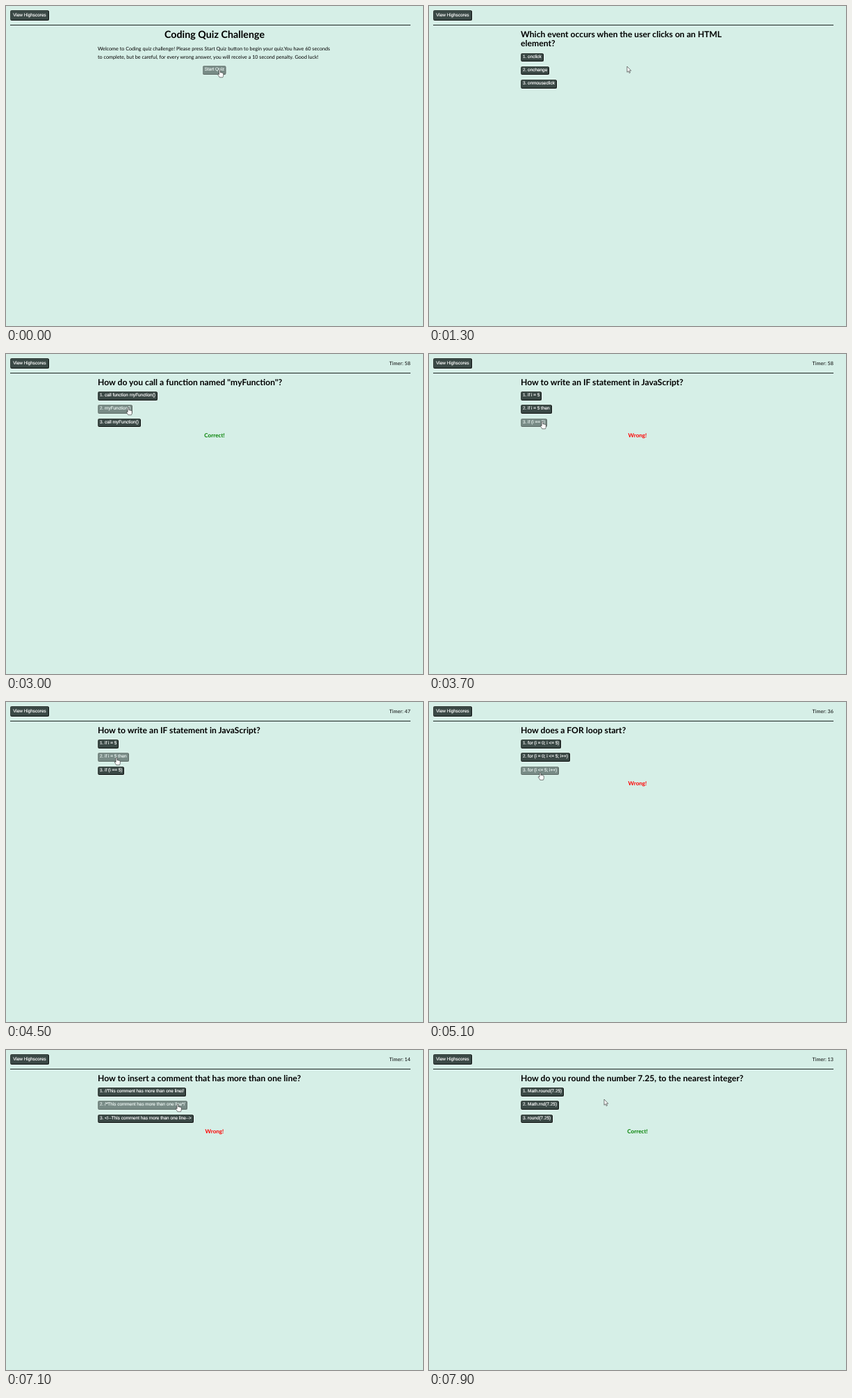
These frames come from a looping animation (600x461 px, 8 s). An HTML page:

```html
<!DOCTYPE html>
<html lang="en">
<head>
<meta charset="utf-8">
<title>Coding Quiz</title>
<style>
  html, body { margin: 0; width: 100%; height: 100%; overflow: hidden; background: #d6efe7; }
  #stage { position: relative; width: 600px; height: 461px; overflow: hidden; color: #000;
    font: 7.23px/11.5px Lato, sans-serif; text-rendering: geometricPrecision; }
  #stage > *, .screen > * { position: absolute; margin: 0; white-space: pre; }
  #stage > .screen { inset: 0; }
  hr { left: 6px; top: 27px; width: 576px; height: 1px; border: 0; background: #1c2523; }
  h1 { left: 0; width: 600px; top: 33px; text-align: center; font: bold 14.3px/18px Lato, sans-serif; }
  h2 { left: 132px; top: 33.9px; font: bold 12.17px/13.5px Lato, sans-serif; }
  p { left: 132px; top: 56px; }
  .button { left: 132px; box-sizing: border-box; height: 12.5px; padding: 0 2px; border-radius: 2.5px;
    border: 1px solid; border-color: #37443f #0c1210 #0c1210 #37443f; background: #3b4946; color: #fff;
    box-shadow: 0 0 0 .7px #e6f7f1; -webkit-text-stroke: .15px #fff;
    font: 6.4px/10.5px "Liberation Sans", Arial, sans-serif; }
  .button.hover { opacity: .6; }
  #scores { left: 6px; top: 6px; height: 15px; padding: 0 3.2px; line-height: 13px; }
  #start { left: 300px; top: 86px; transform: translateX(-50%); }
  #timer { right: 18px; top: 8.4px; }
  #message { left: 0; width: 600px; top: 110.5px; text-align: center; font: bold 8.1px/12px Lato, sans-serif; }
  #pointer { left: 0; top: 0; overflow: visible; fill: #fff; stroke: #222; stroke-width: .6; stroke-linejoin: round; }
</style>
</head>
<body>
<div id="stage">
  <div id="scores" class="button">View Highscores</div>
  <div id="timer"></div>
  <hr>
  <div class="screen">
    <h1>Coding Quiz Challenge</h1>
    <p>Welcome to Coding quiz challenge! Please press Start Quiz button to begin your quiz.You have 60 seconds
to complete, but be careful, for every wrong answer, you will receive a 10 second penalty. Good luck!</p>
    <div id="start" class="button">Start Quiz</div>
  </div>
  <div id="message"></div>
  <svg id="pointer" width="8" height="12">
    <path id="arrow" d="M0 0V8.4L1.9 6.7 3.2 9.6 4.5 9 3.2 6.2H5.8Z"/>
    <path id="hand" d="M-.9 .7Q0-.6 .9 .7V4Q1.8 3.3 2.5 4.2 3.4 3.6 4 4.6 5.2 4.2 5.3 5.6V8Q5.2 9.4 4.4 10.8H-.2Q-1.2 8.8-2.6 7.2-3 5.8-1.8 6L-.9 6.8Z"/>
  </svg>
</div>
<script>
const LOOP = 8000, STEP = 100, FIRST_TICK = 1800, MESSAGE_TIME = 1000, PENALTY = 10;

// Each question opens with the click that answers the previous one.
const questions = [
  { at: 700, title: 'Which event occurs when the user clicks on an HTML\nelement?',
    options: ['onclick', 'onchange', 'onmouseclick'] },
  { at: 2400, verdict: 'Correct!', title: 'How do you call a function named "myFunction"?',
    options: ['call function myFunction()', 'myFunction()', 'call myFunction()'] },
  { at: 3500, verdict: 'Wrong!', title: 'How to write an IF statement in JavaScript?',
    options: ['if i = 5', 'if i = 5 then', 'if (i == 5)'] },
  { at: 4600, verdict: 'Wrong!', title: 'How does a FOR loop start?',
    options: ['for (i = 0; i <= 5)', 'for (i = 0; i <= 5; i++)', 'for (i <= 5; i++)'] },
  { at: 5400, verdict: 'Wrong!', title: 'What is the correct way to write a JavaScript array?',
    options: ['var colors = (1:"red", 2:"green", 3:"blue")', 'var colors = "red", "green", "blue"',
      'var colors = ["red", "green", "blue"]'] },
  { at: 6500, verdict: 'Wrong!', title: 'How to insert a comment that has more than one line?',
    options: ['//This comment has more than one line//', '/*This comment has more than one line*/',
      '<!--This comment has more than one line-->'] },
  { at: 7400, verdict: 'Correct!', title: 'How do you round the number 7.25, to the nearest integer?',
    options: ['Math.round(7.25)', 'Math.rnd(7.25)', 'round(7.25)'] }
];

// Pointer path: time, x, y
const path = [
  [0, 307.5, 92], [700, 307.5, 92], [800, 306, 91], [1000, 306, 91], [1300, 285, 87],
  [1900, 160, 74], [2100, 157, 75], [2600, 157, 75], [3000, 176, 77], [3400, 163, 97],
  [3800, 163, 97], [4300, 159, 80], [4600, 159, 80], [5000, 160, 101.5], [5700, 160, 101.5],
  [6200, 214, 80], [6500, 214, 80], [7100, 247, 78], [7400, 247, 78], [7700, 252, 71], [LOOP, 252, 71]
];

const $ = id => document.getElementById(id);
const stage = $('stage');

function add(parent, tag, text, className = '') {
  const el = document.createElement(tag);
  el.textContent = text;
  el.className = className;
  return parent.appendChild(el);
}

for (const { title, options } of questions) {
  const screen = add(stage, 'div', '', 'screen');
  add(screen, 'h2', title);
  const top = title.includes('\n') ? 67.6 : 54.2;
  options.forEach((option, i) => {
    add(screen, 'div', `${i + 1}. ${option}`, 'button').style.top = top + 19.25 * i + 'px';
  });
}
stage.append($('pointer'));

const screens = [...document.querySelectorAll('.screen')];
const buttons = [...document.querySelectorAll('.button')];

function pointerAt(t) {
  const i = path.findIndex(key => key[0] > t);
  const [t0, x0, y0] = path[i - 1], [t1, x1, y1] = path[i];
  const k = (t - t0) / (t1 - t0);
  return [x0 + (x1 - x0) * k, y0 + (y1 - y0) * k];
}

function timerText(t) {
  if (t < FIRST_TICK) return '';
  const ticks = Math.floor((t - FIRST_TICK) / 1000);
  const lastTick = FIRST_TICK + ticks * 1000;
  const wrong = questions.filter(q => q.verdict === 'Wrong!' && q.at <= lastTick).length;
  return 'Timer: ' + (59 - ticks - PENALTY * wrong);
}

function draw(t) {
  const asked = questions.filter(q => q.at <= t);
  const current = asked[asked.length - 1];
  screens.forEach((screen, i) => screen.style.display = i === asked.length ? '' : 'none');

  $('timer').textContent = timerText(t);
  const verdict = current && t < current.at + MESSAGE_TIME && current.verdict || '';
  $('message').textContent = verdict;
  $('message').style.color = verdict === 'Correct!' ? 'green' : 'red';

  const [x, y] = pointerAt(t);
  let over = false;
  for (const button of buttons) {
    const box = button.getBoundingClientRect();
    const hit = x > box.left && x < box.right && y > box.top && y < box.bottom;
    button.classList.toggle('hover', hit);
    over = over || hit;
  }
  $('pointer').style.transform = `translate(${x}px, ${y}px)`;
  $('hand').style.display = over ? '' : 'none';
  $('arrow').style.display = over ? 'none' : '';
}

const start = performance.now();
function frame() {
  const t = (performance.now() - start) % LOOP;
  draw(Math.floor(t / STEP) * STEP);
  requestAnimationFrame(frame);
}
frame();
</script>
</body>
</html>
```
